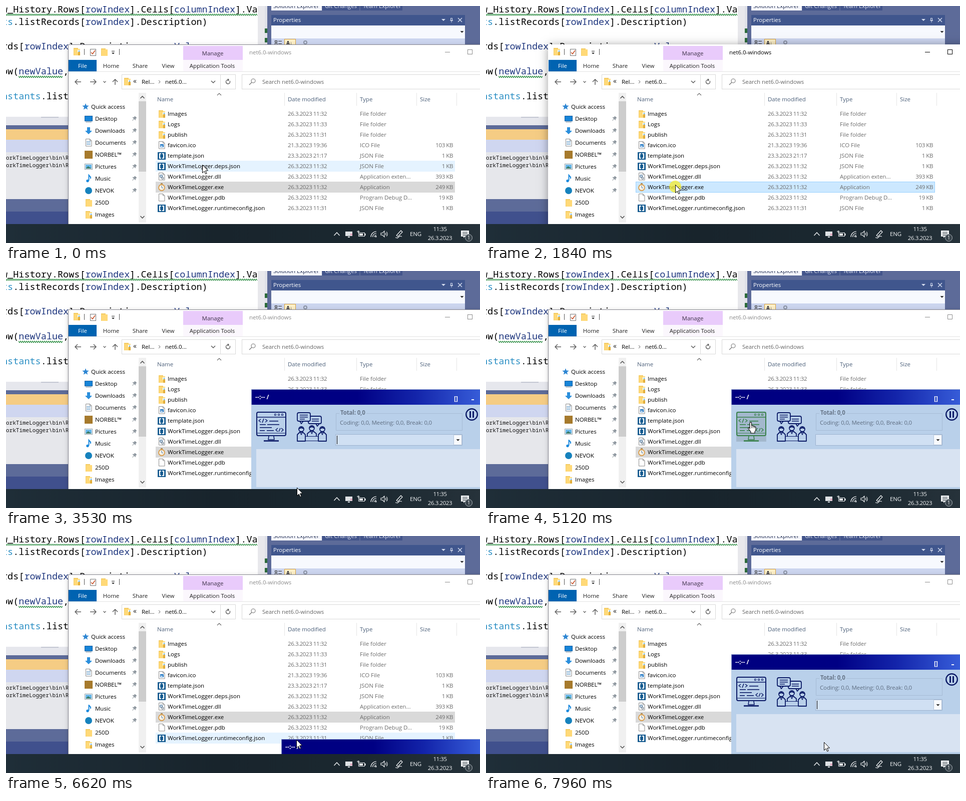
An HTML page with a canvas for the animation above (8000 ms loop, 947 by 475 pixels).

```html
<!DOCTYPE html>
<html lang="en">
<head>
<meta charset="utf-8">
<title>Desktop demo</title>
<style>
html, body { margin: 0; width: 100%; height: 100%; overflow: hidden; background: #5d6b99; }
canvas { display: block; }
</style>
</head>
<body>
<canvas id="stage" width="947" height="475"></canvas>
<script>
const c = document.getElementById('stage').getContext('2d');
const LOOP = 8000;
const UI = '"Open Sans", "Noto Sans", sans-serif';
const MONO = '"Noto Sans Mono", "DejaVu Sans Mono", monospace';

// ---------- drawing helpers ----------
function box(x, y, w, h, fill, line) {
  if (fill) { c.fillStyle = fill; c.fillRect(x, y, w, h); }
  if (line) { c.strokeStyle = line; c.lineWidth = 1; c.strokeRect(x + .5, y + .5, w - 1, h - 1); }
}
function path(pts, line, width = 1, fill, close) {
  c.beginPath();
  pts.forEach(([x, y], i) => i ? c.lineTo(x, y) : c.moveTo(x, y));
  if (close || fill) c.closePath();
  if (fill) { c.fillStyle = fill; c.fill(); }
  if (line) { c.strokeStyle = line; c.lineWidth = width; c.stroke(); }
}
function arc(x, y, r, line, width = 1, fill, from = 0, to = 7) {
  c.beginPath();
  c.arc(x, y, r, from, to);
  if (fill) { c.fillStyle = fill; c.fill(); }
  if (line) { c.strokeStyle = line; c.lineWidth = width; c.stroke(); }
}
// y is the vertical middle of the line
function text(s, x, y, color = '#000', o = {}) {
  const size = o.size || 11.5;
  c.font = `${o.weight || 400} ${size}px ${o.font || UI}`;
  c.letterSpacing = (o.gap ?? -.03) + 'px';
  c.textAlign = o.align || 'left';
  c.fillStyle = color;
  c.fillText(s, x, Math.round(y + size * .37));
}
function chevron(x, y, w, h, color, width = 1.2) {
  path([[x - w, y - h], [x, y + h], [x + w, y - h]], color, width);
}
function drop(x, y, r, color) {
  path([[x - r, y - r / 2], [x + r, y - r / 2], [x, y + r / 2]], null, 1, color);
}
function at(x, y, draw) { c.save(); c.translate(x, y); draw(); c.restore(); }
function clip(x, y, w, h, draw) {
  c.save(); c.beginPath(); c.rect(x, y, w, h); c.clip(); draw(); c.restore();
}
function ramp(x0, x1, stops) {
  const g = c.createLinearGradient(x0, 0, x1, 0);
  stops.forEach(([p, col]) => g.addColorStop(p, col));
  return g;
}

// ---------- small icons ----------
function folder(x, y, paper) {
  box(x, y, 9, 15, '#f3cb62');
  box(x + 1, y + 2, 12, 13, '#ffd978');
  if (paper) {
    box(x + 8, y + 4, 5, 5, '#fff');
    box(x + 9, y + 8, 4, 7, '#e2ae3c');
    box(x + 10, y + 5, 2, 3, '#6fb4e0');
  }
}
function page(x, y) {
  path([[x, y], [x + 8, y], [x + 11.5, y + 3.5], [x + 11.5, y + 14.5], [x, y + 14.5]], '#8b8b8b', 1, '#fff');
  path([[x + 8, y], [x + 8, y + 3.5], [x + 11.5, y + 3.5]], '#8b8b8b');
}
function pin(x, y) {
  at(x, y, () => {
    c.rotate(.75);
    box(-2.5, -5, 5, 4, '#8d969e'); box(-4, -1, 8, 1.5, '#8d969e'); box(-.5, 0, 1, 5, '#8d969e');
  });
}
const fileIcon = {
  dir: (x, y) => folder(x + 1, y - 7, true),
  ico(x, y) { page(x + 1.5, y - 7.5); box(x + 4, y - 2, 7, 6, '#2c7cc4'); box(x + 5, y + 1, 4, 2, '#fff'); },
  json(x, y) {
    box(x - 1, y - 7, 16, 15, '#155a8f');
    path([[x + 6, y - 4], [x + 3, y - 4], [x + 3, y + 5], [x + 6, y + 5]], '#fff', 2.2);
    path([[x + 8, y - 4], [x + 11, y - 4], [x + 11, y + 5], [x + 8, y + 5]], '#fff', 2.2);
  },
  dll(x, y) { page(x + 1.5, y - 7.5); arc(x + 6, y - 1, 2.3, '#5f86a8', 1.6); arc(x + 9, y + 3, 1.9, '#7a8a98', 1.4); },
  exe(x, y) {
    box(x + 5, y - 8, 4, 2, '#a98852');
    arc(x + 7, y + 1, 6, '#d99d4c', 1.8, '#f6f1e6');
    path([[x + 7, y - 3], [x + 7, y + 1], [x + 10, y + 2]], '#4a7fb0');
  },
  pdb: (x, y) => page(x + 1.5, y - 7.5)
};
const navIcon = {
  desk(y) { box(157, y - 6, 16, 11, '#1684d8', '#0b5a9e'); box(159, y + 6, 12, 1, '#5b7890'); },
  down(y) { path([[162, y - 7], [168, y - 7], [168, y], [172, y], [165, y + 7], [158, y], [162, y]], null, 1, '#2b8fdc'); },
  docs(y) { page(159.5, y - 7.5); [-3, 0, 3].forEach(d => box(161, y + d, 8, 1, '#4d8fc4')); },
  square: y => box(157, y - 8, 16, 16, '#a67a2c'),
  pics(y) { box(157, y - 6, 16, 12, '#fff', '#8c9aa5'); box(159, y - 4, 12, 8, '#65b5e8'); path([[159, y + 4], [164, y - 1], [171, y + 4]], null, 1, '#3b7c6b'); },
  note(y) { path([[165.5, y + 4], [165.5, y - 7], [169, y - 3], [169, y]], '#1c8ade', 2); arc(163, y + 4.5, 2.7, null, 1, '#1c8ade'); },
  round: y => arc(165, y, 7, null, 1, '#1682bd'),
  dir: y => folder(159, y - 7),
  dirp: y => folder(159, y - 7, true)
};

const nav = [
  ['Desktop', 'desk'], ['Downloads', 'down'], ['Documents', 'docs'], ['NORBEL™', 'square'],
  ['Pictures', 'pics'], ['Music', 'note'], ['NEVOK', 'round'], ['250D', 'dir'], ['Images', 'dirp']
];
const files = [
  ['Images', '26.3.2023 11:32', 'File folder', '', 'dir'],
  ['Logs', '26.3.2023 11:33', 'File folder', '', 'dir'],
  ['publish', '26.3.2023 11:31', 'File folder', '', 'dir'],
  ['favicon.ico', '21.3.2023 19:36', 'ICO File', '103 KB', 'ico'],
  ['template.json', '23.3.2023 21:17', 'JSON File', '1 KB', 'json'],
  ['WorkTimeLogger.deps.json', '26.3.2023 11:32', 'JSON File', '1 KB', 'json'],
  ['WorkTimeLogger.dll', '26.3.2023 11:32', 'Application exten...', '393 KB', 'dll'],
  ['WorkTimeLogger.exe', '26.3.2023 11:32', 'Application', '249 KB', 'exe'],
  ['WorkTimeLogger.pdb', '26.3.2023 11:32', 'Program Debug D...', '19 KB', 'pdb'],
  ['WorkTimeLogger.runtimeconfig.json', '26.3.2023 11:31', 'JSON File', '1 KB', 'json']
];
const EXE = 7;

// ---------- code editor behind ----------
const K = '#000', P = '#1f377f', B = '#2b8fc4';
const code = [
  [6, ['w_History.Rows[', K], ['rowIndex', P], ['].Cells[', K], ['columnIndex', P], ['].Va', K]],
  [31, ['ts', B], ['.listRecords[', K], ['rowIndex', P], ['].Description)', K]],
  [80, ['rds[', K], ['rowIndex', P], ['].Description = ', K], ['newValue', P], [';', K]],
  [130, ['ow(', K], ['newValue', P], [',', K]],
  [180, ['nstants', B], ['.list', K]]
];
function squiggle(x0, x1, y) {
  const pts = [];
  for (let x = x0, i = 0; x <= x1; x += 2, i++) pts.push([x, y + (i % 2 ? 1.5 : -1.5)]);
  path(pts, '#2f8f45', 1.3);
}
function ide() {
  box(0, 0, 947, 475, '#5d6b99');
  box(0, 0, 503, 222, '#fff');
  clip(0, 0, 503, 222, () => {
    for (const [y, ...parts] of code) {
      let n = 0;
      for (const [s, col] of parts) {
        text(s, -8 + n * 11.1, y, col, { font: MONO, size: 18.5, gap: 0, weight: 500 });
        n += s.length;
      }
    }
    squiggle(0, 503, 17.5);
    squiggle(25, 114, 142);
  });
  box(503, 0, 14, 77, '#e8e8ec');
  box(517, 0, 5, 77, '#dfe1e8');
  box(517, 45, 5, 9, '#2c6b3a');
  box(517, 64, 5, 9, '#2c6b3a');

  box(530, 0, 101, 9, '#f5f6fb');
  box(632, 0, 74, 9, '#43558b');
  box(708, 0, 84, 9, '#43558b');
  text('Solution Explorer', 534, 0, '#1e2a4d');
  text('Git Changes', 637, 0, '#e3e7f3');
  text('Team Explorer', 713, 0, '#e3e7f3');
  box(530, 18, 387, 21, '#40568d');
  text('Properties', 534, 28, '#fff');
  drop(874, 28, 4, '#d5dcee');
  path([[887, 29], [893, 29], [890, 29], [890, 33]], '#d5dcee');
  box(888, 24, 4, 5, null, '#d5dcee');
  path([[903, 24], [911, 32]], '#d5dcee', 1.4);
  path([[911, 24], [903, 32]], '#d5dcee', 1.4);
  box(530, 39, 387, 26, '#f7f9fe');
  drop(911, 52, 3.5, '#1e1e1e');
  box(530, 65, 387, 12, '#ccd5ef');
  for (let i = 0; i < 2; i++) { box(537, 69 + i * 5, 5, 4, null, '#333'); box(544, 70 + i * 5, 7, 1, '#333'); }
  box(556, 66, 23, 12, '#fdf0c8', '#d9a13c');
  text('A↓', 560, 74, '#223', { size: 10, weight: 700 });
  arc(598, 73, 3, '#8b93a5', 2);

  box(0, 222, 125, 17, '#e6e7ed');
  box(70, 222, 35, 2, '#c3c6d2');
  box(0, 247, 125, 21, '#f5cc84');
  box(0, 268, 125, 25, '#cfd6f0');
  box(0, 293, 125, 94, '#e6e7eb');
  const o = { font: MONO, size: 11, gap: 0 };
  text('orkTimeLogger\\bin\\R', 0, 304, '#111', o);
  text('orkTimeLogger\\bin\\R', 0, 319, '#111', o);
  box(0, 412, 125, 25, '#40508d');
}

// ---------- file manager ----------
function explorer(active, hover, headHover) {
  c.save();
  c.shadowColor = `rgba(0,0,0,${active ? .42 : .25})`;
  c.shadowBlur = active ? 18 : 9;
  c.shadowOffsetY = 2;
  box(125, 78, 840, 380, '#fff');
  c.restore();
  const edge = active ? '#fff' : '#85858f';
  box(124, 77, 830, 1, edge);
  box(124, 77, 1, 360, edge);

  // caption and ribbon tabs
  folder(135, 84, true);
  box(156, 86, 1, 12, '#555');
  box(168, 86, 12, 14, '#fff', '#777');
  path([[170, 93], [173, 96], [178, 89]], '#c8542c', 1.6);
  folder(190, 85);
  box(211, 90, 6, 1, '#222');
  drop(214, 95, 3, '#222');
  box(226, 86, 1, 12, '#555');
  box(354, 80, 119, 28, '#e9cbfb');
  box(354, 108, 119, 23, '#fbf7fd');
  box(125, 108, 56, 23, '#0063b1');
  const mid = { align: 'center' };
  text('Manage', 413, 95, '#3d3148', mid);
  text('File', 153, 120, '#fff', mid);
  text('Home', 210, 120, '#222', mid);
  text('Share', 268, 120, '#222', mid);
  text('View', 324, 120, '#222', mid);
  text('Application Tools', 412, 120, '#222', mid);
  const cap = active ? '#000' : '#8b8b8b';
  text('net6.0-windows', 486, 93, cap);
  box(877, 92, 10, 1, cap);
  box(922, 87, 10, 10, null, cap);
  box(125, 131, 822, 1, '#e3e3e3');

  // address row
  const g = '#555';
  path([[150, 152], [138, 152]], g, 1.4); path([[143, 147], [138, 152], [143, 157]], g, 1.4);
  path([[168, 152], [180, 152]], g, 1.4); path([[175, 147], [180, 152], [175, 157]], g, 1.4);
  chevron(197, 152, 2.5, 1.3, g);
  path([[218, 158], [218, 147]], g, 1.4); path([[213, 152], [218, 147], [223, 152]], g, 1.4);
  box(231, 137, 228, 30, '#fff', '#d9d9d9');
  box(428, 137, 1, 30, '#d9d9d9');
  folder(236, 144, true);
  text('«', 254, 150, '#222', { size: 14 });
  text('Rel...', 271, 152);
  path([[305, 149], [308, 152], [305, 155]], g);
  text('net6.0...', 318, 152);
  chevron(414, 152, 4, 2, g, 1.4);
  arc(443.5, 152, 4, g, 1.4, null, -.5, 4.7);
  path([[443, 145], [446, 148], [443, 151]], null, 1, g);
  box(471, 137, 490, 30, '#fff', '#d9d9d9');
  arc(494, 150, 4, '#777', 1.1);
  path([[491, 153], [486, 158]], '#777', 1.2);
  text('Search net6.0-windows', 512, 152, '#666');

  // navigation pane
  const star = Array.from({ length: 10 }, (_, i) => {
    const a = i * Math.PI / 5 - Math.PI / 2, r = i % 2 ? 3 : 7;
    return [159 + r * Math.cos(a), 202 + r * Math.sin(a)];
  });
  path(star, null, 1, '#2d86d3');
  text('Quick access', 170, 202);
  nav.forEach(([name, icon], i) => {
    const y = 226 + 24 * i;
    navIcon[icon](y);
    text(name, 178, y);
    if (i < 7) pin(256, y);
  });
  box(265, 174, 15, 260, '#f0f0f0');
  box(265, 191, 15, 141, '#cdcdcd');
  chevron(272.5, 183, 4, -2, g, 1.6);
  chevron(272.5, 423, 4, 2, g, 1.6);

  // list
  if (headHover) box(557, 174, 143, 26, '#d9ebf9');
  [556, 700, 820, 900].forEach(x => box(x, 174, 1, 26, '#e5e5e5'));
  chevron(426, 177, 4, -2, '#666', 1.1);
  [['Name', 302], ['Date modified', 563], ['Type', 707], ['Size', 827]]
    .forEach(([s, x]) => text(s, x, 187, '#4c607a'));
  files.forEach(([name, date, type, size, icon], i) => {
    const y = 216 + 21 * i, hot = hover === i;
    if (i === EXE) box(299, y - 11, 598, 22, hot ? '#cce8ff' : '#d9d9d9', hot && '#99d1ff');
    else if (hot) box(299, y - 11, 598, 22, '#e5f3ff');
    fileIcon[icon](304, y);
    text(name, 323, y);
    text(date, 563, y, '#6d6d6d', { gap: -.43 });
    text(type, 707, y, '#6d6d6d');
    text(size, 893, y, '#6d6d6d', { align: 'right', gap: -.43 });
  });
}

// ---------- logger window ----------
const NAVY = '#0b1a66', GREEN = '#38814a', BODY = '#b9d0ea', HOT = '#a3b8cd';
function codingIcon(hot) {
  const k = hot ? GREEN : NAVY;
  if (hot) box(500, 282, 60, 60, HOT);
  c.lineJoin = 'round';
  c.beginPath(); c.roundRect(501, 283, 58, 47, 3); c.strokeStyle = k; c.lineWidth = 2; c.stroke();
  path([[501, 293], [559, 293]], k, 1.6);
  [538, 545, 552].forEach(x => box(x - 2, 286, 4, 4, null, k));
  path([[509, 297], [505, 300], [509, 303]], k, 1.5);
  path([[512, 304], [515, 296]], k, 1.5);
  path([[518, 297], [522, 300], [518, 303]], k, 1.5);
  [[526, 300, 18], [507, 307, 12], [522, 307, 24], [507, 313, 24], [507, 319, 10], [521, 319, 14]]
    .forEach(([x, y, w]) => box(x, y, w, 1.6, k));
  path([[543, 315], [539, 318.5], [543, 322]], k, 1.5);
  path([[545, 322], [548, 315]], k, 1.5);
  path([[550, 315], [554, 318.5], [550, 322]], k, 1.5);
  path([[502, 325], [558, 325]], k, 1.2);
  path([[525, 331], [524, 338], [536, 338], [535, 331]], k, 1.6);
  path([[515, 340.5], [545, 340.5]], k, 2.6);
}
function meetingIcon(hot) {
  const k = hot ? GREEN : NAVY, body = hot ? HOT : BODY;
  if (hot) box(581, 282, 60, 60, HOT);
  const bubble = (x, y, w, h, tail) => {
    c.beginPath(); c.roundRect(x, y, w, h, 3);
    c.fillStyle = body; c.fill(); c.strokeStyle = k; c.lineWidth = 1.8; c.stroke();
    path([[tail - 3, y + h], [tail, y + h + 5], [tail + 4, y + h]], k, 1.8);
  };
  bubble(604, 291, 26, 15, 622);
  bubble(582, 284, 26, 17, 590);
  [288, 292, 296].forEach((y, i) => box(587, y, i === 2 ? 10 : 16, 1.5, k));
  [296, 300].forEach(y => box(611, y, 14, 1.5, k));
  const person = (x, y, w, base) => {
    path([[x - w, base], [x - w, y + 11], [x - 3, y + 6], [x + 3, y + 6], [x + w, y + 11], [x + w, base]], k, 1.8, body);
    arc(x, y, 5, k, 1.8, body);
    path([[x - 5, y - 1], [x, y - 3], [x + 5, y - 1]], k, 2);
    path([[x - 2, y + 7], [x, y + 11], [x + 2, y + 7]], k, 1.4);
  };
  person(611, 315, 9, 332);
  box(595, 331, 33, 10, body, k);
  person(590, 317, 8, 341);
  person(632, 317, 8, 341);
}
function caption(x, y) {
  box(x - 1, y - 1, 960 - x, 31, '#7f93c8');
  box(x, y, 960 - x, 30, ramp(x, 960, [[0, '#000080'], [.45, '#000084'], [.7, '#1324aa'], [1, '#3a62dd']]));
  text('--:-- /', x + 7, y + 15, '#fff', { weight: 700, size: 12, gap: .1 });
}
function logger(open, caret, m) {
  if (!open) { caption(551, 408); return; }
  box(490, 237, 457, 200, BODY);
  caption(491, 238);
  text('[]', 895, 256, '#fff', { weight: 700, size: 12, gap: 0 });
  box(930, 257, 5, 2, '#fff');
  codingIcon(over(m, 500));
  meetingIcon(over(m, 581));
  box(659, 285, 253, 35, null, '#a6bbd5');
  box(666, 283, 54, 5, BODY);
  text('Total: 0,0', 668, 284, '#68778a', { weight: 700, size: 11.5, gap: -.15 });
  text('Coding: 0,0, Meeting: 0,0, Break: 0,0', 667, 304, '#5f6e82', { gap: -.15 });
  arc(930.5, 287.5, 11.3, NAVY, 2.4);
  box(926, 281, 3, 13, NAVY);
  box(932, 281, 3, 13, NAVY);
  box(658, 327, 254, 23, '#d0e0f3', '#9db3cf');
  box(894, 328, 17, 21, '#f8fafd', '#b4c4d9');
  drop(903, 339, 3.5, '#222');
  if (caret) box(661, 330, 1, 17, '#000');
  box(500, 357, 447, 76, '#d8e3f2');
}
const over = ({ x, y }, left) => x >= left && x < left + 60 && y >= 282 && y < 342;

// ---------- taskbar ----------
function taskbar() {
  box(0, 437, 947, 38, ramp(0, 947, [[0, '#1f2e38'], [.45, '#18242c'], [.75, '#1b2830'], [1, '#26323a']]));
  const w = '#f0f2f4';
  chevron(661, 457, 5.5, -3, w, 1.4);
  box(678, 452, 14, 9, '#dfe3e6'); box(683, 462, 4, 2, '#dfe3e6'); box(688, 456, 4, 4, '#e0a8c0');
  box(704, 454, 13, 8, null, w); box(706, 456, 7, 4, w); box(717, 456, 1.5, 4, w);
  path([[704, 450], [704, 455]], w, 1.4); path([[701, 452], [707, 452]], w);
  [4, 7.5, 11].forEach(r => arc(740, 463, r, w, 1.2, null, Math.PI, Math.PI * 1.5));
  arc(739, 462, 1.5, null, 1, w);
  path([[749, 455], [752, 455], [756, 451], [756, 463], [752, 459], [749, 459]], w, 1.1, null, true);
  [3, 6].forEach(r => arc(756, 457, r, w, 1.1, null, -.8, .8));
  path([[780, 460], [789, 450], [792, 453], [783, 462], [780, 460]], w, 1.3);
  path([[778, 464], [782, 465], [787, 461], [791, 462]], w, 1.2);
  text('ENG', 807, 457, w, { gap: -.2 });
  const o = { align: 'center', gap: -.43 };
  text('11:35', 867, 447, w, o);
  text('26.3.2023', 867, 465, w, o);
  path([[909, 450], [925, 450], [925, 462], [917, 462], [914, 465], [914, 462], [909, 462]], null, 1, w);
  [453, 456, 459].forEach(y => box(912, y, 10, 1, '#26323a'));
  arc(924.5, 464.5, 7, '#aab2b8', 1, '#39444c');
  text('1', 924.5, 464.5, '#fff', { align: 'center', size: 10 });
}

// ---------- pointer ----------
// time, x, y
const moves = [
  [460, 392, 318], [840, 378, 358], [2950, 378, 358], [3250, 470, 405], [3450, 560, 457],
  [3530, 581, 434], [3590, 581, 434], [3660, 606, 436], [3740, 606, 436], [4060, 618, 366],
  [4340, 618, 366], [5060, 527, 303], [5480, 527, 303], [5720, 610, 312], [5870, 610, 312],
  [6150, 482, 372], [6400, 522, 398], [6600, 580, 408], [6665, 580, 408], [6675, 584, 414],
  [6700, 584, 414], [7130, 666, 236], [7250, 678, 188], [7355, 682, 208], [7430, 682, 208],
  [7490, 682, 240], [7550, 682, 246], [7955, 675, 413]
];
function pointerAt(t) {
  const i = moves.findIndex(m => m[0] > t);
  if (i === 0) return { x: moves[0][1], y: moves[0][2] };
  if (i < 0) { const l = moves[moves.length - 1]; return { x: l[1], y: l[2] }; }
  const [t0, x0, y0] = moves[i - 1], [t1, x1, y1] = moves[i];
  const k = (t - t0) / (t1 - t0);
  return { x: Math.round(x0 + (x1 - x0) * k), y: Math.round(y0 + (y1 - y0) * k) };
}
function arrow(x, y) {
  at(x + .5, y + .5, () => path(
    [[0, 0], [0, 16], [3.7, 12.6], [6.3, 18.2], [8.6, 17.2], [6.1, 11.6], [11, 11.3]], '#000', 1, '#fff'));
}
function hand(x, y) {
  at(x - 4, y, () => {
    c.lineJoin = 'round';
    path([[4, 1], [6, 0], [7.5, 1], [7.5, 7], [10, 7], [11, 8], [13, 8], [14, 9], [16, 10], [16, 16],
      [14, 19], [14, 22], [6, 22], [6, 19], [1, 13], [1, 11], [3, 11], [4, 13]], '#000', 1.1, '#fff');
    [7.5, 10.5, 13.5].forEach(px => path([[px, 8], [px, 12]], '#000', .8));
  });
}

// ---------- timeline ----------
const within = (t, spans) => spans.find(([a, b]) => t >= a && t < b);
const clicks = [[1040, 1100], [1840, 1910], [1980, 2110]];
const opened = [[3530, 6130], [6670, 7130], [7955, LOOP]];

function draw(t) {
  const m = pointerAt(t);
  const span = within(t, opened), open = !!span;
  const shown = t >= 2980;
  const inApp = shown && (open ? m.x >= 491 && m.y >= 238 : m.x >= 551 && m.y >= 409);
  const inList = !inApp && m.x >= 299 && m.x < 897;
  const row = inList && m.y < 437 ? Math.floor((m.y - 209) / 21) : -1;
  const head = !inApp && m.x > 556 && m.x < 700 && m.y >= 174 && m.y < 200;

  ide();
  explorer(t >= 1040 && t < 2380, row, head);
  if (shown) logger(open, open && Math.floor((t - span[0]) / 530) % 2 === 0, m);
  taskbar();

  if (within(t, clicks)) arc(m.x, m.y + 4, 12, null, 1, 'rgba(246,236,44,.75)');
  if (t >= 2110 && t < 2980) arc(m.x + 17, m.y + 8, 5, '#2f8fd8', 2.4);
  if (open && (over(m, 500) || over(m, 581))) hand(m.x, m.y);
  else arrow(m.x, m.y);
}

const start = performance.now();
function tick() {
  draw((performance.now() - start) % LOOP);
  requestAnimationFrame(tick);
}
tick();
</script>
</body>
</html>
```
